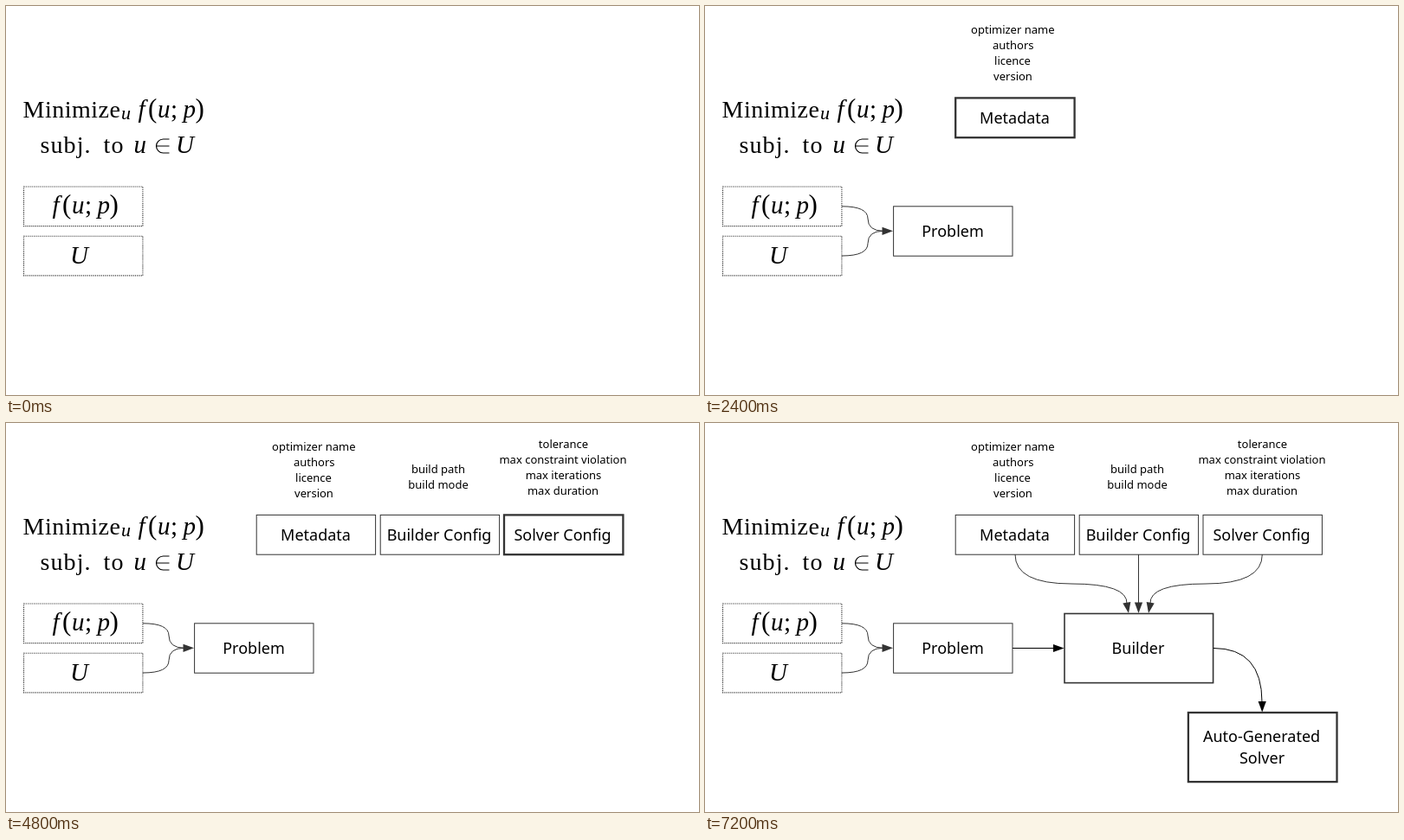
Recreate the animation shown at these times as an HTML page. Size 800x450 px, loop 8 s.

```html
<!DOCTYPE html>
<html lang="en">
<head>
<meta charset="utf-8">
<title>Solver generation</title>
<style>
html, body { margin: 0; width: 100%; height: 100%; overflow: hidden; background: #fff }
svg { display: block; width: 800px; height: 450px; animation: tint 8s step-end infinite }
text { font-family: "Noto Sans", "Open Sans", sans-serif; font-size: 18px; text-anchor: middle }
.note text { font-size: 13px }
.math text { font-family: "Liberation Serif", serif; font-size: 29px; text-anchor: start }
.math .roman { font-size: 28px; letter-spacing: .5px }
.math .wide { letter-spacing: 1.1px }
.math .it { font-style: italic }
.math .sub { font-size: 22px }
.math .paren { font-size: 31px }
rect, .wire { fill: none; stroke: #333; stroke-width: 1 }
.wire.black { stroke: #000 }
.tip { fill: #333 }
.tip.black { fill: #000 }
.dotted { stroke-width: 1.15; stroke-dasharray: 1.15 }

/* Each step appears with a heavy outline, which thins at the next step. */
.step { animation: 8s step-end infinite }
.step rect { animation: 8s step-end infinite }
.s1 { animation-name: show1 } .s1 rect { animation-name: thin1 }
.s2 { animation-name: show2 } .s2 rect { animation-name: thin2 }
.s3 { animation-name: show3 } .s3 rect { animation-name: thin3 }
.s4 { animation-name: show4 } .s4 rect { animation-name: thin4 }
.s5 { animation-name: show5 } .s5 rect { animation-name: thin5 }
.s6 { animation-name: show6 } .s6 rect { stroke-width: 2.3 }
@keyframes show1 { 0% { opacity: 0 } 15%, 100% { opacity: 1 } }
@keyframes show2 { 0% { opacity: 0 } 30%, 100% { opacity: 1 } }
@keyframes show3 { 0% { opacity: 0 } 45%, 100% { opacity: 1 } }
@keyframes show4 { 0% { opacity: 0 } 60%, 100% { opacity: 1 } }
@keyframes show5 { 0% { opacity: 0 } 75%, 100% { opacity: 1 } }
@keyframes show6 { 0% { opacity: 0 } 90%, 100% { opacity: 1 } }
@keyframes thin1 { 0% { stroke-width: 2.3 } 30%, 100% { stroke-width: 1 } }
@keyframes thin2 { 0% { stroke-width: 2.3 } 45%, 100% { stroke-width: 1 } }
@keyframes thin3 { 0% { stroke-width: 2.3 } 60%, 100% { stroke-width: 1 } }
@keyframes thin4 { 0% { stroke-width: 2.3 } 75%, 100% { stroke-width: 1 } }
@keyframes thin5 { 0% { stroke-width: 2.3 } 90%, 100% { stroke-width: 1.6 } }
@keyframes tint {
  0% { background: #fff }
  15% { background: #fbfbfb }
  30%, 100% { background: #fff }
}
</style>
</head>
<body>
<svg viewBox="0 0 800 450">
  <defs>
    <path id="head" d="M0 0L-12.5 -4.6V4.6Z"/>
    <g id="cost" class="math">
      <text class="it" x="53.5" y="240">f</text>
      <text class="paren" x="65" y="240">(</text>
      <text class="it" x="76" y="240">u</text>
      <text x="91" y="240">;</text>
      <text class="it" x="105.5" y="240">p</text>
      <text class="paren" x="119.5" y="240">)</text>
    </g>
  </defs>

  <g class="math">
    <text class="roman" x="19.5" y="129">Minimize</text>
    <text class="it sub" x="133" y="131">u</text>
    <use href="#cost" x="99" y="-111"/>
    <text class="roman wide" x="39.5" y="170">subj.</text>
    <text class="roman wide" x="112.5" y="170">to</text>
    <text class="it" x="147.5" y="170">u</text>
    <path d="M188.5 154H181.5A8 8 0 0 0 181.5 170H188.5M173.5 162H188.5" fill="none" stroke="#000" stroke-width="1.2"/>
    <text class="it" x="196" y="170">U</text>
    <use href="#cost"/>
    <text class="it" x="74" y="298">U</text>
  </g>
  <rect class="dotted" x="20.5" y="209" width="137.4" height="45.6"/>
  <rect class="dotted" x="20.5" y="266.2" width="137.4" height="45.6"/>

  <g class="step s1">
    <path class="wire" d="M158 231.8Q188 231.8 188 246T206 260.3M158 289Q188 289 188 274.6T206 260.3"/>
    <use href="#head" class="tip" x="217" y="260.3"/>
    <rect x="217.6" y="231.8" width="137.4" height="57.4"/>
    <text x="286" y="267">Problem</text>
  </g>

  <g class="step s2">
    <g class="note">
      <text x="355.3" y="32">optimizer name</text>
      <text x="355.8" y="50">authors</text>
      <text x="355" y="68">licence</text>
      <text x="355.5" y="86">version</text>
    </g>
    <rect x="289.2" y="106.4" width="137.4" height="45.8"/>
    <text x="357.5" y="136">Metadata</text>
  </g>

  <g class="step s3">
    <g class="note">
      <text x="499" y="58">build path</text>
      <text x="499" y="76">build mode</text>
    </g>
    <rect x="432.2" y="106.4" width="137.4" height="45.8"/>
    <text x="500" y="136">Builder Config</text>
  </g>

  <g class="step s4">
    <g class="note">
      <text x="643.5" y="29">tolerance</text>
      <text x="643" y="47">max constraint violation</text>
      <text x="643.5" y="65">max iterations</text>
      <text x="643" y="83">max duration</text>
    </g>
    <rect x="575" y="106.4" width="137.4" height="45.8"/>
    <text x="642.5" y="136">Solver Config</text>
  </g>

  <g class="step s5">
    <path class="wire" d="M358 152Q358 186 423 186T487 209M500.5 152V209M643.3 152Q643.3 186 578 186T514 209"/>
    <use href="#head" class="tip" transform="translate(489 220) rotate(80)"/>
    <use href="#head" class="tip" transform="translate(500.5 220) rotate(90)"/>
    <use href="#head" class="tip" transform="translate(512 220) rotate(100)"/>
    <path class="wire black" d="M355 260.5H403"/>
    <use href="#head" class="tip black" x="414.5" y="260.5"/>
    <rect x="415" y="220.5" width="171.6" height="80.1"/>
    <text x="500" y="267">Builder</text>
  </g>

  <g class="step s6">
    <path class="wire black" d="M587 260.5Q643 260.5 643 323"/>
    <use href="#head" class="tip black" transform="translate(643.2 334.5) rotate(90)"/>
    <rect x="557.9" y="335" width="171.6" height="80.1"/>
    <text x="642.5" y="369">Auto-Generated</text>
    <text x="643" y="394">Solver</text>
  </g>
</svg>
</body>
</html>
```
